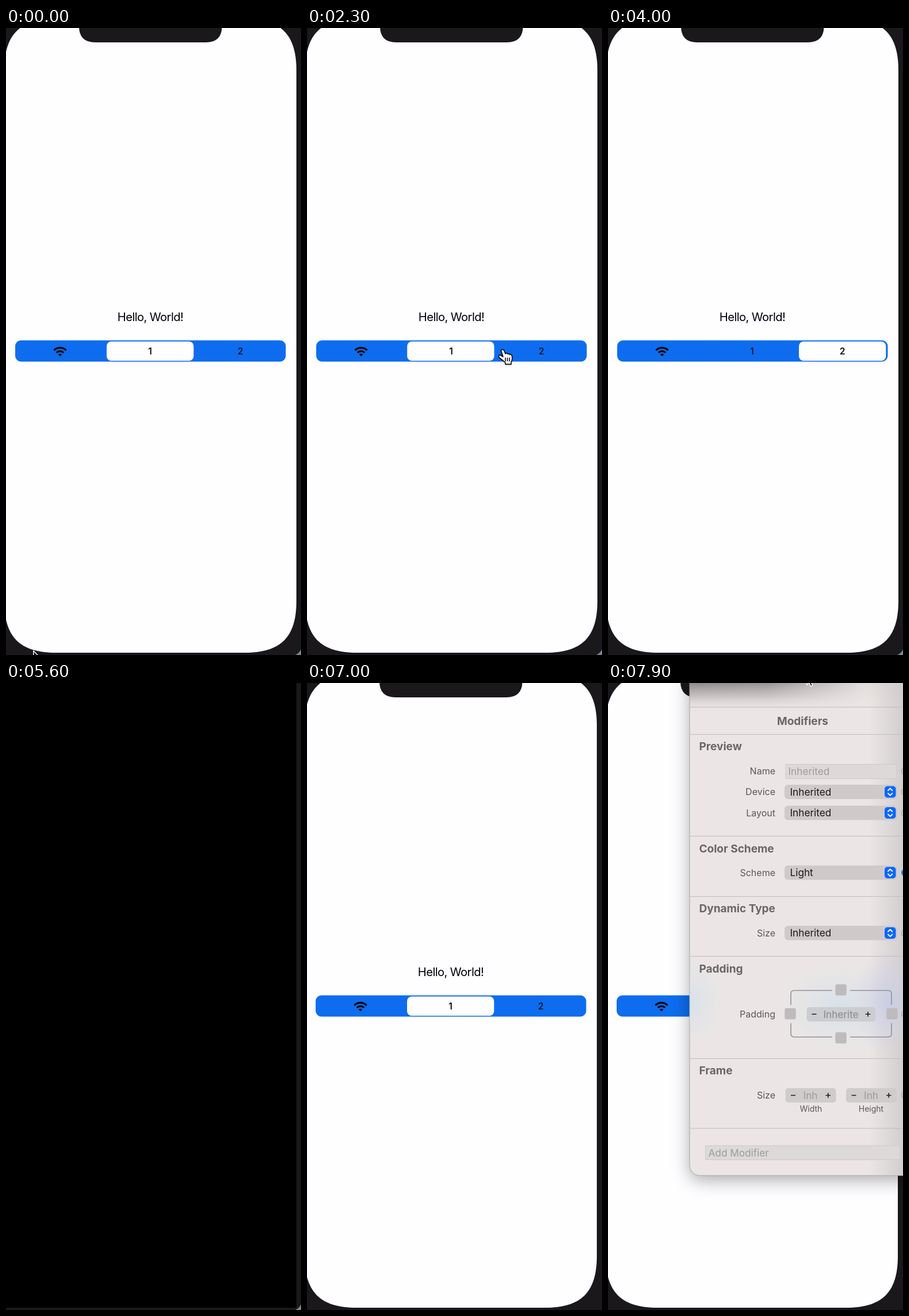
These frames come from a looping animation (513 px wide and 1091 px high, 8 s). An HTML page:

```html
<!DOCTYPE html>
<html lang="en">
<head>
<meta charset="utf-8">
<title>Segmented control</title>
<style>
html, body { margin: 0; width: 100%; height: 100%; overflow: hidden; background: #1a181b; }
svg { display: block; width: 513px; height: 1091px; font-family: Inter, Roboto, sans-serif; }

.phone, .pill, .one, .two, .line, .cursor, .arrow, .hand, .black, .desk, .panel {
  animation: 8s step-end infinite;
}
.phone { animation-name: nudge; }
.desk { animation-name: desk; }
.pill { animation-name: slide; }
.one { animation-name: one; }
.two { animation-name: two; }
.line.a { animation-name: line-a; }
.line.b { animation-name: line-b; }
.cursor { animation-name: travel; }
.arrow { animation-name: arrow; }
.hand { animation-name: hand; }
.black { animation-name: blackout; }
.panel { animation-name: drag; }

@keyframes nudge { 0% { transform: none; } 78.75%, 100% { transform: translateX(-1px); } }
@keyframes desk { 0% { transform: none; } 78.75%, 100% { transform: translate(5px, 4px); } }
@keyframes blackout { 0% { opacity: 0; } 70% { opacity: 1; } 71.25%, 100% { opacity: 0; } }

@keyframes slide {
  0% { transform: translateX(175px); }
  13.75% { transform: translateX(175px); animation-timing-function: steps(3, start); }
  17.5% { transform: translateX(21px); }
  25% { transform: translateX(21px); animation-timing-function: steps(3, start); }
  28.75% { transform: translateX(174.2px); }
  32.5% { transform: translateX(175px); animation-timing-function: steps(3, start); }
  36.25% { transform: translateX(332px); }
  71.25%, 100% { transform: translateX(175px); }
}
@keyframes one {
  0% { font-weight: 600; } 15% { font-weight: 500; } 26.25% { font-weight: 600; }
  33.75% { font-weight: 500; } 71.25%, 100% { font-weight: 600; }
}
@keyframes two {
  0% { font-weight: 500; } 33.75% { font-weight: 600; } 71.25%, 100% { font-weight: 500; }
}
@keyframes line-a { 0% { opacity: 0; } 35% { opacity: .25; } 71.25%, 100% { opacity: 0; } }
@keyframes line-b { 0% { opacity: 0; } 15% { opacity: .25; } 26.25%, 100% { opacity: 0; } }

@keyframes travel {
  0% { transform: translate(48px, 1084px); }
  2.5% { transform: translate(48px, 1084px); animation-timing-function: steps(6, start); }
  10% { transform: translate(86px, 630px); animation-timing-function: steps(3, start); }
  13.75% { transform: translate(104px, 561px); }
  17.5% { transform: translate(104px, 561px); animation-timing-function: steps(5, start); }
  23.75% { transform: translate(262px, 560px); }
  26.25% { transform: translate(262px, 560px); animation-timing-function: steps(3, start); }
  30% { transform: translate(337px, 559px); animation-timing-function: steps(2, start); }
  32.5% { transform: translate(405px, 560px); }
  36.25% { transform: translate(405px, 560px); animation-timing-function: steps(7, start); }
  45%, 100% { transform: translate(420px, -40px); }
}
@keyframes arrow { 0% { opacity: 1; } 2.5%, 100% { opacity: 0; } }
@keyframes hand { 0% { opacity: 0; } 2.5%, 100% { opacity: 1; } }

@keyframes drag {
  0% { transform: translate(360px, 60px); visibility: hidden; }
  93.75% { transform: translate(360px, 60px); visibility: visible; animation-timing-function: steps(5, start); }
  100% { transform: none; visibility: visible; }
}

.hello { font-size: 20.2px; letter-spacing: -.6px; }
.digit { font-size: 15.6px; fill: #0a0a10; }
.mid { text-anchor: middle; }
.sheet { filter: drop-shadow(0 8px 15px rgba(0, 0, 0, .32)); }
.head { font-size: 19px; font-weight: 700; fill: #6a6665; }
.label { font-size: 16px; fill: #5c5857; text-anchor: end; }
.small { font-size: 14px; fill: #5c5857; text-anchor: middle; }
.value { font-size: 17.2px; fill: #1b1919; }
.hint { font-size: 17.2px; fill: #9f9b9b; }
.field { fill: #ddd9d8; stroke: #cdc9c8; }
.step { fill: #d0cccc; }
.sign { stroke: #1d1b1b; stroke-width: 1.6; fill: none; }
</style>
</head>
<body>
<svg viewBox="0 0 513 1091">
  <defs>
    <path id="arrowShape" d="M0 0V17L4 13.5L6.6 19.6L9.6 18.3L7 12.4H12.3Z"/>
    <g id="menu">
      <rect x="307" y="-12.5" width="196" height="25" rx="6" fill="#cfcac9"/>
      <rect x="481" y="-10" width="19.5" height="20" rx="5" fill="#0b67fb"/>
      <path d="M487-2.5l3.7-3.7 3.7 3.7M487 2.5l3.7 3.7 3.7-3.7" fill="none" stroke="#fff" stroke-width="1.8" stroke-linecap="round" stroke-linejoin="round"/>
    </g>
    <rect id="knob" x="-9.7" y="-9.7" width="19.4" height="19.4" rx="3" fill="#bfbbbc"/>
    <circle id="ring" cx="516.5" r="6" fill="none" stroke="#a9a5a5" stroke-width="1.3"/>
    <g id="sizer">
      <rect class="step" x="0" y="-12.5" width="88" height="25" rx="5"/>
      <path class="sign" d="M9.500 0h8M70 0h8.500M74.250-4.250v8.500"/>
    </g>
    <clipPath id="sheetClip"><path d="M142-80H600V857H160A18 18 0 0 1 142 839Z"/></clipPath>
    <linearGradient id="topShade" x2="0" y2="1">
      <stop offset="0" stop-color="#8d8988"/>
      <stop offset=".45" stop-color="#b4b0af" stop-opacity=".7"/>
      <stop offset="1" stop-color="#ebe6e5" stop-opacity="0"/>
    </linearGradient>
    <linearGradient id="topFade">
      <stop offset="0" stop-color="#ebe6e5" stop-opacity="0"/>
      <stop offset=".45" stop-color="#ebe6e5" stop-opacity=".1"/>
      <stop offset="1" stop-color="#ebe6e5" stop-opacity=".9"/>
    </linearGradient>
    <linearGradient id="sideShade">
      <stop offset="0" stop-color="#c9c5c5" stop-opacity="0"/>
      <stop offset="1" stop-color="#c9c5c5"/>
    </linearGradient>
    <radialGradient id="glow">
      <stop offset="0" stop-color="#cfe0ea"/>
      <stop offset="1" stop-color="#dfe4e8" stop-opacity="0"/>
    </radialGradient>
    <radialGradient id="violet">
      <stop offset="0" stop-color="#c6cae6"/>
      <stop offset="1" stop-color="#d2d2e4" stop-opacity="0"/>
    </radialGradient>
  </defs>

  <rect width="513" height="1091" fill="#1a181b"/>

  <g class="phone">
    <path fill="#fefdff" d="M-3 74C-3 11 24-16 87-16H415C478-16 505 11 505 74V997C505 1060 478 1087 415 1087H87C24 1087-3 1060-3 997Z"/>
    <path fill="#1a181b" d="M127-20V-3Q127 25 155 25H347.500Q375.500 25 375.500-3V-20Z"/>
    <text class="hello mid" x="251" y="510.300">Hello, World!</text>
    <rect x="16" y="543.500" width="470.500" height="37" rx="10" fill="#0e6dee"/>
    <path class="line a" d="M173.500 553V571" stroke="#33517c"/>
    <path class="line b" d="M329.500 553V571" stroke="#33517c"/>
    <rect class="pill" y="545.500" width="151.300" height="33.500" rx="8" fill="#fefdff"/>
    <g transform="translate(94 571)" fill="none" stroke="#050507" stroke-width="3.100">
      <path d="M-10.600-10.200A15 15 0 0 1 10.600-10.200M-6.300-6A8.900 8.900 0 0 1 6.300-6"/>
      <path d="M0 .3L-3.400-3A4.900 4.900 0 0 1 3.400-3Z" fill="#050507" stroke="none"/>
    </g>
    <text class="digit mid one" x="250.500" y="568.200">1</text>
    <text class="digit mid two" x="407.500" y="568.200">2</text>
  </g>

  <g class="black">
    <rect width="513" height="1091" fill="#191919"/>
    <rect width="505" height="1087" fill="#000"/>
  </g>
  <path class="desk" d="M503 1091Q510 1088 513 1081V1091Z" fill="#7e8695"/>

  <g class="cursor">
    <use class="arrow" href="#arrowShape" fill="#000" stroke="#fff" stroke-width="1.500"/>
    <path class="hand" fill="#fff" stroke="#000" stroke-width="1.500" stroke-linejoin="round" style="filter: drop-shadow(0 1px 1px rgba(0,0,0,.35))"
      d="M1 4Q0 1 2.500 .5Q5 0 6 3L8 8Q9 6 11.500 7.200L12.300 8.500Q14.500 7 16 9.500Q18.500 8.500 19.300 11L19.800 15Q20 19 18 22V26H8V23L-3 14Q-4.500 10 -1 10L4 13ZM8 14.500V21M11.500 14.500V21M15 14.500V21"/>
  </g>

  <g class="panel">
    <g class="sheet">
      <path d="M142-80H600V857H160A18 18 0 0 1 142 839Z" fill="#ebe6e5" stroke="#aaa6a6"/>
    </g>
    <g clip-path="url(#sheetClip)">
      <rect x="142" y="-80" width="458" height="80" fill="#9b9796"/>
      <rect x="142" y="0" width="458" height="50" fill="url(#topShade)"/>
      <rect x="142" y="-80" width="300" height="130" fill="url(#topFade)"/>
      <rect x="442" y="-80" width="158" height="130" fill="#ebe6e5" opacity=".9"/>
      <rect x="455" y="0" width="60" height="857" fill="url(#sideShade)" opacity=".75"/>
      <rect x="515" y="0" width="85" height="857" fill="#c9c5c5" opacity=".75"/>
      <ellipse cx="135" cy="555" rx="72" ry="82" fill="url(#glow)" opacity=".8"/>
      <ellipse cx="405" cy="565" rx="115" ry="82" fill="url(#glow)" opacity=".8"/>
      <ellipse cx="487" cy="555" rx="62" ry="95" fill="url(#violet)" opacity=".85"/>
    </g>
    <path d="M142 42H600M142 89.500H600M142 266.500H600M142 371.500H600M142 475.500H600M142 653.500H600M142 775H600" stroke="#c0bcbb" stroke-width="1.200"/>

    <text class="head mid" x="338.500" y="72.700">Modifiers</text>
    <text class="head" x="158.500" y="117.300">Preview</text>
    <text class="head" x="158.500" y="294.500">Color Scheme</text>
    <text class="head" x="158.500" y="399.300">Dynamic Type</text>
    <text class="head" x="158.500" y="503.500">Padding</text>
    <text class="head" x="158.500" y="681.300">Frame</text>

    <text class="label" x="291" y="159">Name</text>
    <text class="label" x="291" y="195">Device</text>
    <text class="label" x="291" y="231.500">Layout</text>
    <text class="label" x="291" y="336">Scheme</text>
    <text class="label" x="291" y="440.500">Size</text>
    <text class="label" x="291" y="581.500">Padding</text>
    <text class="label" x="291" y="722.500">Size</text>

    <rect class="field" x="309" y="141.500" width="193" height="25"/>
    <text class="hint" x="313.500" y="160">Inherited</text>
    <use href="#menu" y="189.500"/>
    <use href="#menu" y="226"/>
    <use href="#menu" y="330"/>
    <use href="#menu" y="435"/>
    <text class="value" x="316.500" y="195.500">Inherited</text>
    <text class="value" x="316.500" y="232">Inherited</text>
    <text class="value" x="316.500" y="336.300">Light</text>
    <text class="value" x="316.500" y="441">Inherited</text>

    <use href="#ring" y="153.500"/>
    <use href="#ring" y="189.500"/>
    <use href="#ring" y="226"/>
    <circle cx="516.500" cy="330" r="6.500" fill="#0b7fe8"/>
    <use href="#ring" y="435"/>
    <use href="#ring" y="576"/>
    <use href="#ring" y="717"/>

    <path d="M390 535H324Q318 535 318 541V560M318 592V610Q318 616 324 616H390M421 616H487Q493 616 493 610V592M493 560V541Q493 535 487 535H421" fill="none" stroke="#959194" stroke-width="1.600"/>
    <use href="#knob" x="405" y="534"/>
    <use href="#knob" x="317" y="575.500"/>
    <use href="#knob" x="494" y="575.500"/>
    <use href="#knob" x="405" y="617.500"/>
    <rect x="345.500" y="564" width="120" height="25" rx="5" fill="#cbcdd0"/>
    <path class="sign" d="M354.500 576.200h8M447.700 576.200h8.500M452 572v8.500"/>
    <text class="hint mid" x="405" y="582.500" style="fill:#8b898c">Inherite</text>

    <use href="#sizer" x="308.500" y="717.500"/>
    <use href="#sizer" x="414" y="717.500"/>
    <text class="hint mid" x="352" y="723.500">Inh</text>
    <text class="hint mid" x="457.500" y="723.500">Inh</text>
    <text class="small" x="353" y="746">Width</text>
    <text class="small" x="457.500" y="746">Height</text>

    <rect class="field" x="169.500" y="805" width="338.500" height="24.500"/>
    <text class="hint" x="174.500" y="823.500">Add Modifier</text>
    <use href="#arrowShape" x="346" y="-14" fill="#000" stroke="#fff" stroke-width="1.500"/>
  </g>
</svg>
</body>
</html>
```
